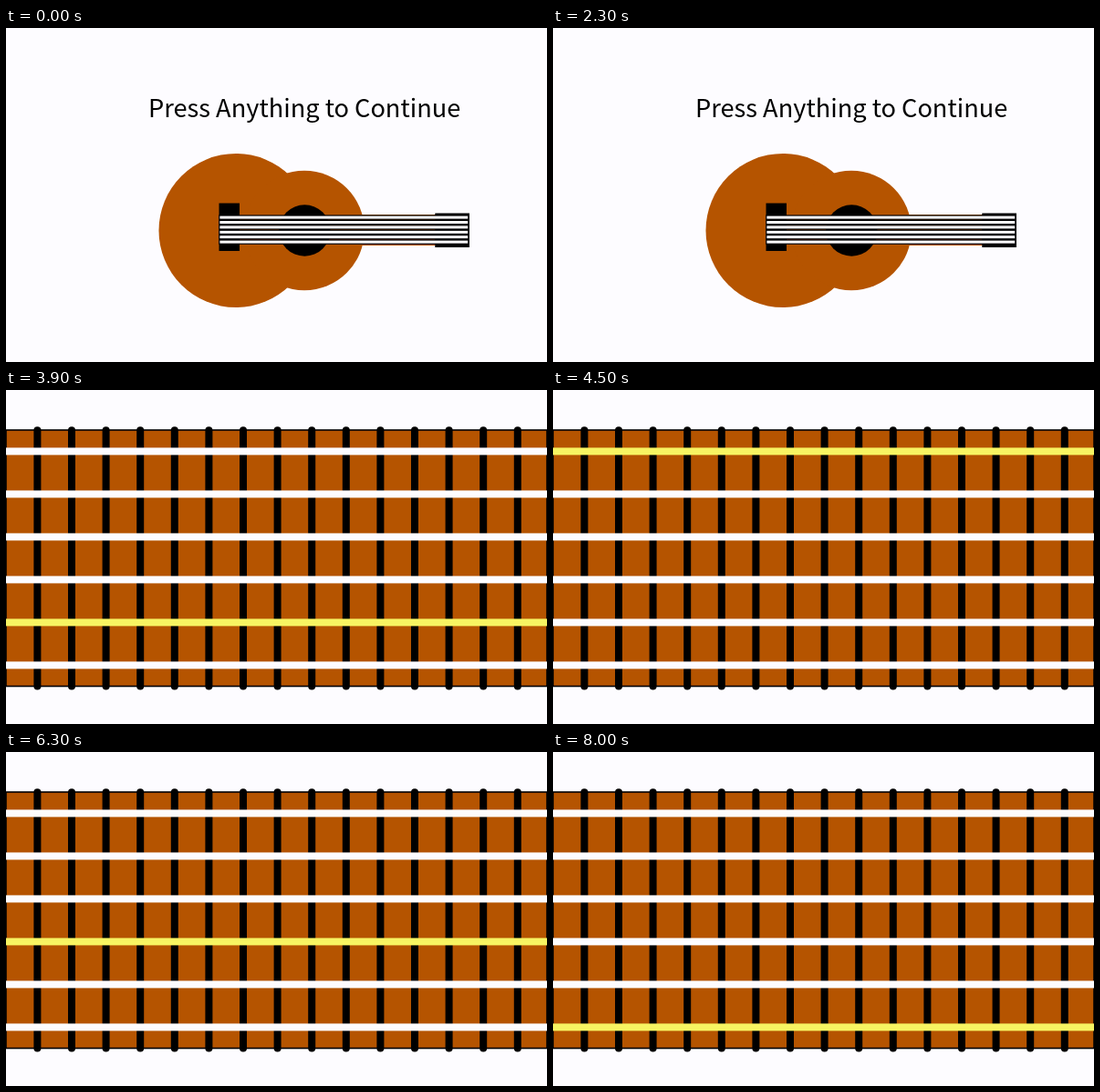
Write an HTML page that moves like this. It is 593 px wide and 367 px high and loops after 8400 ms.

```html
<!DOCTYPE html>
<html lang="en">
<head>
<meta charset="utf-8">
<title>Guitar strings</title>
<style>
  html, body { margin: 0; width: 100%; height: 100%; overflow: hidden; background: #fdfcff; }
  svg { display: block; width: 100vw; height: 100vh; }
  text { font: 27.2px "Noto Sans CJK JP", "Noto Sans CJK SC", "Noto Sans CJK", "Open Sans", sans-serif; }
  .wood { fill: #b55400; }
</style>
</head>
<body>
<svg viewBox="0 0 593 367">
  <g id="intro">
    <text x="327.2" y="98" text-anchor="middle">Press Anything to Continue</text>
    <g class="wood">
      <circle cx="252" cy="222.5" r="84.5"/>
      <circle cx="327" cy="222.5" r="65.8"/>
      <rect x="380" y="205" width="92" height="34"/>
    </g>
    <circle cx="327.3" cy="222.5" r="28.2"/>
    <rect x="233.5" y="192.5" width="22.5" height="52.5"/>
    <rect x="470.3" y="203.5" width="37.7" height="37.5"/>
    <g id="thin"></g>
  </g>
  <g id="neck">
    <rect class="wood" x="0" y="44" width="593" height="281.5" stroke="#000" stroke-width="1.6"/>
    <g id="frets" stroke="#000" stroke-width="8" stroke-linecap="round"></g>
    <g id="strings"></g>
  </g>
</svg>
<script>
const LOOP = 8400, NECK_AT = 2400;
const WHITE = '#fdfcff', LIT = '#f7f462';
// [time in ms, lit string from the top]
const plucks = [[3100, 0], [3600, 4], [4000, 0], [5100, 2], [6300, 3], [7000, 1], [7500, 5]];

const $ = id => document.getElementById(id);

function add(parent, tag, attrs) {
  const el = document.createElementNS('http://www.w3.org/2000/svg', tag);
  for (const k in attrs) el.setAttribute(k, attrs[k]);
  return $(parent).appendChild(el);
}

const strings = [];
for (let i = 0; i < 6; i++) {
  add('thin', 'rect', {
    x: 233.8, y: 206 + i * 5.4, width: 273, height: 4.2,
    fill: WHITE, stroke: '#000', 'stroke-width': 1.2
  });
  strings.push(add('strings', 'rect', { x: 0, y: 63.4 + i * 47, width: 593, height: 8 }));
}
for (let i = 0; i < 15; i++) {
  const x = 34.4 + i * 37.6;
  add('frets', 'line', { x1: x, x2: x, y1: 44.2, y2: 325.4 });
}

const start = performance.now();

function draw(now) {
  const t = Math.max(0, now - start) % LOOP;
  const onNeck = t >= NECK_AT;
  $('intro').style.display = onNeck ? 'none' : '';
  $('neck').style.display = onNeck ? '' : 'none';
  let lit = -1;
  for (const [at, string] of plucks) if (t >= at) lit = string;
  strings.forEach((s, i) => s.setAttribute('fill', i === lit ? LIT : WHITE));
  requestAnimationFrame(draw);
}
draw(start);
</script>
</body>
</html>
```
